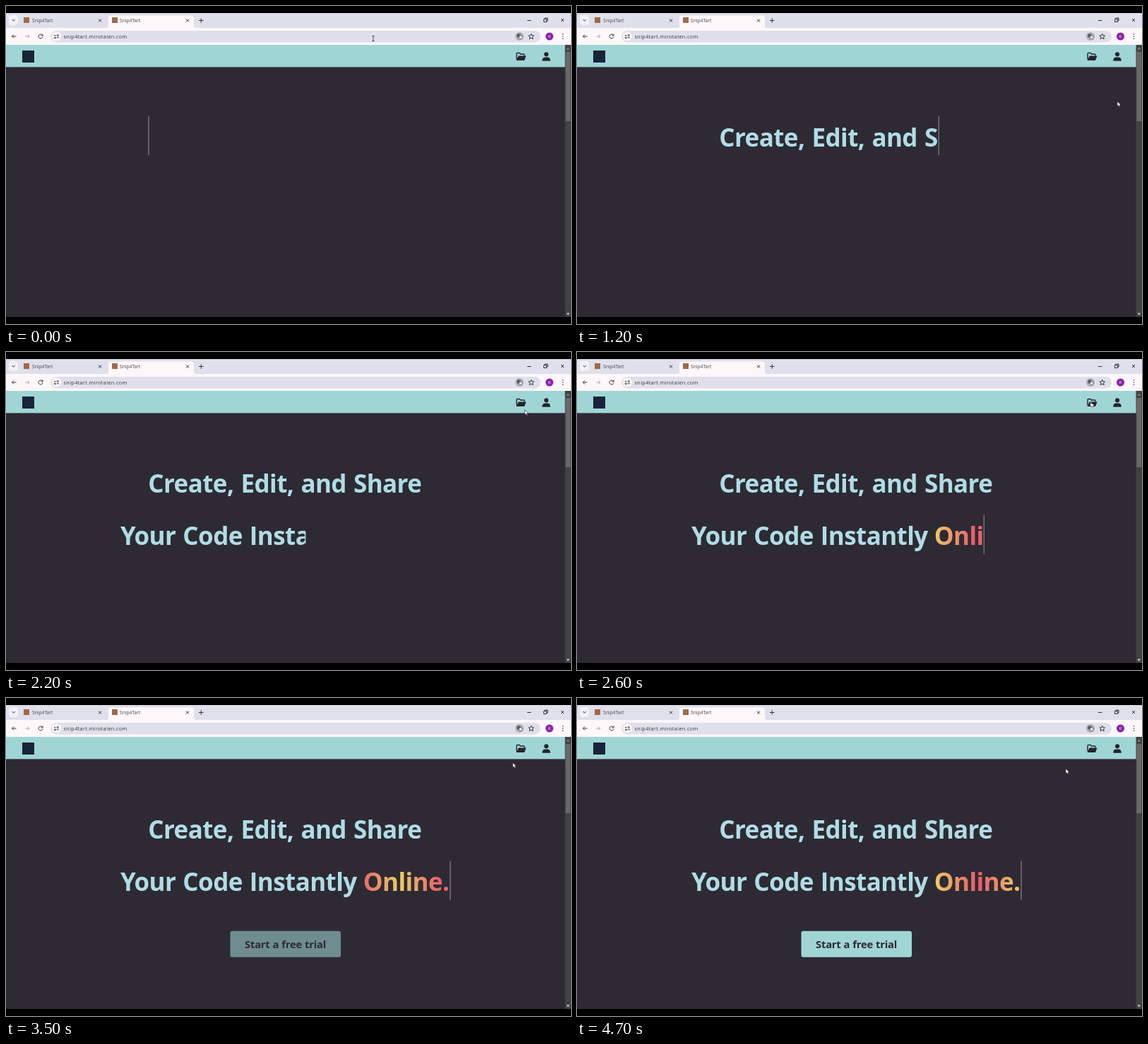
Write an HTML page that moves like this. It is 800 by 450 pixels and loops after 4800 ms.

```html
<!DOCTYPE html>
<html lang="en">
<head>
<meta charset="utf-8">
<title>Snip4Tart</title>
<style>
html, body { margin: 0; width: 100%; height: 100%; overflow: hidden; background: #000; }
svg { display: block; width: 800px; height: 450px; }
text { font-family: "Open Sans", "Noto Sans", sans-serif; }
.head { font-size: 35px; font-weight: 700; letter-spacing: -.6px; word-spacing: 1.6px; fill: #b0dce6; }
.cta { font-size: 14.8px; font-weight: 700; letter-spacing: -.25px; word-spacing: .5px; fill: #2d2a33; }
.tab { font-size: 6.7px; fill: #45464d; }
.url { font-size: 7.2px; fill: #33343a; }
.line { fill: none; stroke: #33343a; stroke-width: 1; }
</style>
</head>
<body>
<svg viewBox="0 0 800 450">
  <defs>
    <linearGradient id="warm" gradientUnits="userSpaceOnUse" x1="507" x2="628" y1="0" y2="0" spreadMethod="repeat">
      <stop offset="0" stop-color="#eccc68"/>
      <stop offset=".5" stop-color="#e8596b"/>
      <stop offset="1" stop-color="#eccc68"/>
    </linearGradient>
    <clipPath id="clip1"><rect id="mask1" x="200" y="156" height="55"/></clipPath>
    <clipPath id="clip2"><rect id="mask2" x="161" y="231" height="55"/></clipPath>
    <path id="cross" class="line" d="M-2-2 2 2M2-2-2 2"/>
  </defs>

  <!-- tab strip -->
  <rect y="10" width="800" height="22" fill="#dfe0eb"/>
  <rect x="4" y="13" width="13" height="14" rx="4" fill="#f1f1f9"/>
  <path class="line" d="M8.5 19l2.2 2.2 2.2-2.2"/>
  <path d="M141 31.500q4 0 4-4v-10q0-4 4-4h113q4 0 4 4v10q0 4 4 4z" fill="#fdf7f9"/>
  <rect x="25" y="16" width="8" height="8" fill="#a06a48"/>
  <rect x="150" y="16" width="8" height="8" fill="#a06a48"/>
  <text class="tab" x="37" y="22.800">Snip4Tart</text>
  <text class="tab" x="161" y="22.800">Snip4Tart</text>
  <use href="#cross" x="133" y="20.500"/>
  <use href="#cross" x="257" y="20.500"/>
  <path class="line" d="M273 20.500h6.500M276.250 17.250v6.500M738 20.500h5.500M761.500 18.500h4v4h-4zM763 18v-1h4v4h-1"/>
  <use href="#cross" x="788" y="20"/>

  <!-- toolbar -->
  <rect y="31" width="800" height="24.500" fill="#fdf7f9"/>
  <rect x="63" y="35" width="694" height="16.500" rx="8.250" fill="#dfe0eb"/>
  <path class="line" d="M14.500 43h-6M11 40.500l-2.500 2.500 2.500 2.500M51.500 41.200a3 3 0 1 0 .5 2.500M52 39.500v2.500h-2.500"/>
  <path class="line" style="stroke:#a9a9b0" d="M27 43h6M30.500 40.500l2.500 2.500-2.500 2.500"/>
  <circle cx="71.500" cy="43" r="6.300" fill="#fdf7f9"/>
  <path class="line" d="M68 41.500h2.500M72 44.800h3"/>
  <circle class="line" cx="73.300" cy="41.500" r="1.100"/>
  <circle class="line" cx="69.500" cy="44.800" r="1.100"/>
  <text class="url" x="81.500" y="45.600" letter-spacing=".4">snip4tart.mirotalen.com</text>
  <circle cx="727" cy="43" r="6" fill="#aeb0b9"/>
  <rect x="723.500" y="39.500" width="5" height="5" rx="1" fill="#55575f"/>
  <rect x="726.500" y="42" width="4.500" height="4.500" rx="1" fill="#e9e9ee" stroke="#55575f" stroke-width=".7"/>
  <path class="line" stroke-linejoin="round" d="M743.700 39.200l1.100 2.600 2.800.2-2.100 1.900.7 2.800-2.500-1.500-2.500 1.500.7-2.800-2.100-1.900 2.800-.2z"/>
  <circle cx="769.500" cy="43" r="5.500" fill="#8f22aa"/>
  <text x="769.500" y="45.100" font-size="5.800" text-anchor="middle" fill="#fff">K</text>
  <path d="M788.500 39.800v.01M788.500 43v.01M788.500 46.200v.01" stroke="#33343a" stroke-width="1.600" stroke-linecap="round"/>

  <!-- page -->
  <rect y="55" width="792" height="385" fill="#2d2a33"/>
  <rect y="55" width="792" height="31.400" fill="#a0d5d6"/>
  <rect x="23" y="63" width="17" height="17" fill="#18243a"/>
  <path d="M723 75.500v-8q0-1 1-1h3l1.500 1.500h4.500q1 0 1 1v1.500" fill="none" stroke="#25232b" stroke-width="1.400"/>
  <path d="M725.700 70.500h10.800l-2.500 6.500h-11.500z" fill="#25232b"/>
  <circle cx="765" cy="68.300" r="3.100" fill="#25232b"/>
  <path d="M759.200 77.800q0-5.300 4.500-5.300h2.600q4.500 0 4.500 5.300z" fill="#25232b"/>

  <rect x="791.500" y="55" width="8.500" height="385" fill="#424242"/>
  <rect x="792.300" y="65" width="7" height="98" fill="#686868"/>
  <path d="M793.500 61.500l2.300-3 2.300 3z" fill="#858585"/>
  <path d="M793.500 434.500l2.300 3 2.300-3z" fill="#d5d5d5"/>

  <g clip-path="url(#clip1)"><text class="head" x="201.300" y="198.700">Create, Edit, and Share</text></g>
  <g clip-path="url(#clip2)">
    <text class="head" x="162" y="273.400">Your Code Instantly</text>
    <text class="head" x="505.800" y="273.400" style="fill:url(#warm)">Online.</text>
  </g>
  <rect id="caret" width="1" height="55" fill="#95959b"/>
  <g id="button">
    <rect x="317.500" y="329.800" width="156.500" height="37" rx="3" fill="#a0d5d6"/>
    <text class="cta" x="395.500" y="354" text-anchor="middle">Start a free trial</text>
  </g>

  <g id="pointer">
    <path id="arrow" d="M0 0v7l1.700-1.500 1.100 2.500 1.300-.6-1.100-2.400h2.200z" fill="#fff" stroke="#17161b" stroke-width=".6"/>
    <path id="hand" d="M0 .500q.8-1 1.500 0v2.500l2.800.8q.7.300.5 1.200l-.6 2.500h-3l-2.200-3q0-1 1 -.5z" fill="#fff" stroke="#17161b" stroke-width=".6"/>
    <path id="beam" d="M-1.500-3.500h3M0-3.500v7M-1.500 3.500h3" stroke="#33343a" stroke-width=".9"/>
  </g>
</svg>
<script>
const LOOP = 4800, LINE1 = 1510, LINE2 = 2740, FADE = 1950;
const el = id => document.getElementById(id);
const set = (id, attrs) => { for (const k in attrs) el(id).setAttribute(k, attrs[k]); };
const clamp = v => Math.min(1, Math.max(0, v));
const show = (id, on) => set(id, { opacity: +on });

// pointer stops: time, x, y
const stops = [
  [0, 520, 46], [100, 520, 46], [550, 765, 135], [1200, 765, 135], [1700, 765, 130],
  [2400, 727, 70], [2750, 727, 70], [3050, 717, 82], [3500, 717.5, 91.5],
  [3600, 699, 86], [4200, 674.5, 68], [4700, 692, 100], [LOOP, 692, 100]
];

function pointerAt(t) {
  const i = stops.findIndex(s => s[0] > t);
  const [t0, x0, y0] = stops[i - 1], [t1, x1, y1] = stops[i];
  const p = (t - t0) / (t1 - t0), k = p * p * (3 - 2 * p);
  return [x0 + (x1 - x0) * k, y0 + (y1 - y0) * k];
}

function draw(t) {
  const w1 = 388 * clamp((t + 30) / (LINE1 + 30)) * (t >= 50);
  const w2 = 467 * clamp((t - LINE1) / (LINE2 - LINE1));
  const second = t >= LINE1;
  set("mask1", { width: w1 + 1 });
  set("mask2", { width: w2 + 1 });
  set("caret", second ? { x: 161.5 + w2, y: 230.7 } : { x: 201.5 + w1, y: 156 });
  show("caret", !second || (t - LINE1 + 100) % 1000 < 500);
  set("warm", { gradientTransform: `translate(${121 * (t - 2635) / 2070})` });
  set("button", { opacity: 1 - (1 - clamp((t - LINE2) / FADE)) ** 1.75 });

  const [x, y] = pointerAt(t);
  const beam = y < 52, hand = t > 2350 && t < 2850;
  set("pointer", { transform: `translate(${x} ${y})` });
  show("beam", beam);
  show("hand", hand);
  show("arrow", !beam && !hand);
}

const start = performance.now();
function tick() {
  draw((performance.now() - start) % LOOP);
  requestAnimationFrame(tick);
}
tick();
</script>
</body>
</html>
```
